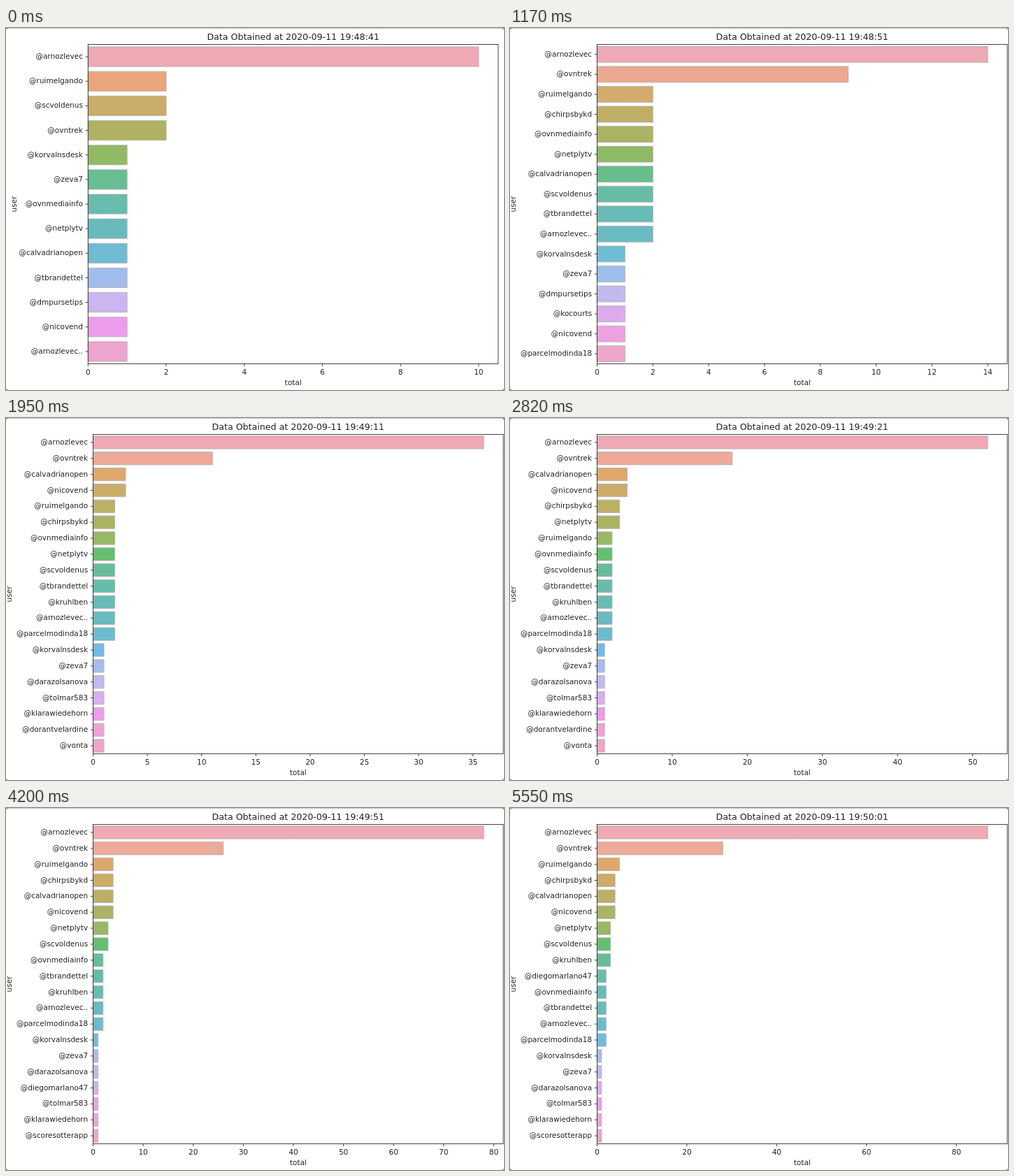
These frames come from a looping animation (712 by 518 pixels, 5580 ms). An HTML page with a canvas:

```html
<!DOCTYPE html>
<html lang="en">
<head>
<meta charset="utf-8">
<title>Mentions per user</title>
<style>
  html, body { margin: 0; width: 712px; height: 518px; overflow: hidden; background: #fff; }
  canvas { display: block; }
</style>
</head>
<body>
<canvas id="chart" width="712" height="518"></canvas>
<script>
const ctx = document.getElementById('chart').getContext('2d');
const LOOP = 5580, STEP = 600;
const LEFT = 124.5, RIGHT = 711, TOP = 23.5, BOTTOM = 480.5;
const FONT = '"DejaVu Sans", sans-serif';
const INK = '#222';

const users = {
  a: 'arnozlevec', j: 'ruimelgando', f: 'scvoldenus', t: 'ovntrek',
  m: 'korvalnsdesk', v: 'zeva7', i: 'ovnmediainfo', n: 'netplytv',
  o: 'calvadrianopen', r: 'tbrandettel', k: 'dmpursetips', l: 'nicovend',
  z: 'arnozlevec..', w: 'chirpsbykd', u: 'kocourts', d: 'parcelmodinda18',
  s: 'kruhlben', e: 'darazolsanova', h: 'tolmar583', g: 'klarawiedehorn',
  b: 'dorantvelardine', c: 'vonta', y: 'diegomarlano47', x: 'scoresotterapp'
};

// Ranking, the two highest totals, then one digit per user; the rest have 1.
const scenes = [
  { order: 'ajftmvinorklz', top: [10, 2], tail: '22', dx: -7.2, axisX: 22 },
  { order: 'atjwinofrzmvkuld', top: [14, 9], tail: '22222222' },
  { order: 'atoljwinfrzdmvkusehg', top: [25, 10], tail: '3222222222' },
  { order: 'atoljwinfrszdmvehgbc', top: [36, 11], tail: '33222222222' },
  { order: 'atolwnjifrszdmvehgbc', top: [52, 18], tail: '44332222222' },
  { order: 'atolwjnifrszdmvehgbc', top: [60, 20], tail: '44433222222' },
  { order: 'atjwolnifrszdmveyhgx', top: [67, 22], tail: '44443222222', scale: .9966, dx: -1.1, dy: .6 },
  { order: 'atjwolnfirszdmveyhgx', top: [78, 26], tail: '44443322222' },
  { order: 'atjwolnfsyirzdmvehgx', top: [87, 28], tail: '544433322222' }
];

// CIE LCh(uv) to linear RGB
function linearRgb(l, chroma, hue) {
  const y = ((l + 16) / 116) ** 3;
  const u = chroma * Math.cos(hue) / (13 * l) + .19783;
  const v = chroma * Math.sin(hue) / (13 * l) + .46832;
  const x = 9 * y * u / (4 * v), z = 3 * y / v - x / 3 - 5 * y;
  return [
    3.24097 * x - 1.53738 * y - .49861 * z,
    -.96924 * x + 1.87597 * y + .04156 * z,
    .05563 * x - .20398 * y + 1.05697 * z
  ];
}

// Evenly spaced HUSL hues, desaturated and blended with white
function barColor(index, count) {
  const hue = (index / count + .01) % 1 * 359 * Math.PI / 180, l = 69;
  let lo = 0, hi = 250;
  for (let n = 0; n < 24; n++) {
    const mid = (lo + hi) / 2;
    if (linearRgb(l, mid, hue).every(c => c >= 0 && c <= 1)) lo = mid; else hi = mid;
  }
  const rgb = linearRgb(l, lo * .92, hue)
    .map(c => c <= .0031308 ? 12.92 * c : 1.055 * c ** (1 / 2.4) - .055);
  const middle = (Math.max(...rgb) + Math.min(...rgb)) / 2;
  const mixed = rgb.map(c => Math.round(255 * (.2 + .8 * (middle + .75 * (c - middle)))));
  return `rgb(${mixed})`;
}

function text(str, x, y, align = 'center', size = 10.5) {
  ctx.font = `${size}px ${FONT}`;
  ctx.textAlign = align;
  ctx.fillStyle = INK;
  ctx.fillText(str, x, y);
}

function line(x1, y1, x2, y2) {
  ctx.beginPath();
  ctx.moveTo(x1, y1);
  ctx.lineTo(x2, y2);
  ctx.stroke();
}

function drawWindow() {
  ctx.setTransform(1, 0, 0, 1, 0, 0);
  ctx.fillStyle = '#888';
  ctx.fillRect(0, 0, 712, 518);
  ctx.fillStyle = '#fff';
  ctx.beginPath();
  ctx.roundRect(0, .5, 712, 517.5, 4);
  ctx.fill();
}

function drawChart(index) {
  const { order, top, tail, scale = 1, dx = 0, dy = 0, axisX = 7.6 } = scenes[index];
  const count = order.length, pitch = (BOTTOM - TOP) / count;
  const limit = top[0] * 1.05, unit = (RIGHT - LEFT) / limit;
  const center = (LEFT + RIGHT) / 2;

  drawWindow();
  ctx.setTransform(scale, 0, 0, scale, dx, dy);
  ctx.lineWidth = .84;

  [...order].forEach((key, row) => {
    const total = row < 2 ? top[row] : +(tail[row - 2] || 1);
    const y = TOP + pitch * (row + .5);
    ctx.fillStyle = barColor(row, count);
    ctx.strokeStyle = '#b0b0b0';
    ctx.beginPath();
    ctx.rect(LEFT, y - pitch * .4, total * unit, pitch * .8);
    ctx.fill();
    ctx.stroke();
    ctx.strokeStyle = INK;
    line(LEFT - 3.7, y, LEFT, y);
    text('@' + users[key], LEFT - 7.4, y + 3.1, 'right');
  });

  const step = top[0] < 15 ? 2 : top[0] < 40 ? 5 : top[0] < 80 ? 10 : 20;
  for (let value = 0; value <= limit; value += step) {
    const x = LEFT + value * unit;
    line(x, BOTTOM, x, BOTTOM + 3.7);
    text(value, x, 495.8);
  }
  ctx.strokeRect(LEFT, TOP, RIGHT - LEFT, BOTTOM - TOP);

  const seconds = 41 + 10 * index;
  const clock = `19:${48 + Math.floor(seconds / 60)}:${String(seconds % 60).padStart(2, '0')}`;
  text(`Data Obtained at 2020-09-11 ${clock}`, center, 17.2, 'center', 12.6);
  text('total', center, 510.7);

  ctx.translate(axisX, (TOP + BOTTOM) / 2);
  ctx.rotate(-Math.PI / 2);
  text('user', 0, 0);
}

const start = performance.now();
let shown = -1;

function tick() {
  const time = (performance.now() - start) % LOOP;
  const index = Math.min(scenes.length - 1, Math.floor(time / STEP));
  if (index !== shown) drawChart(shown = index);
  requestAnimationFrame(tick);
}
tick();
</script>
</body>
</html>
```
